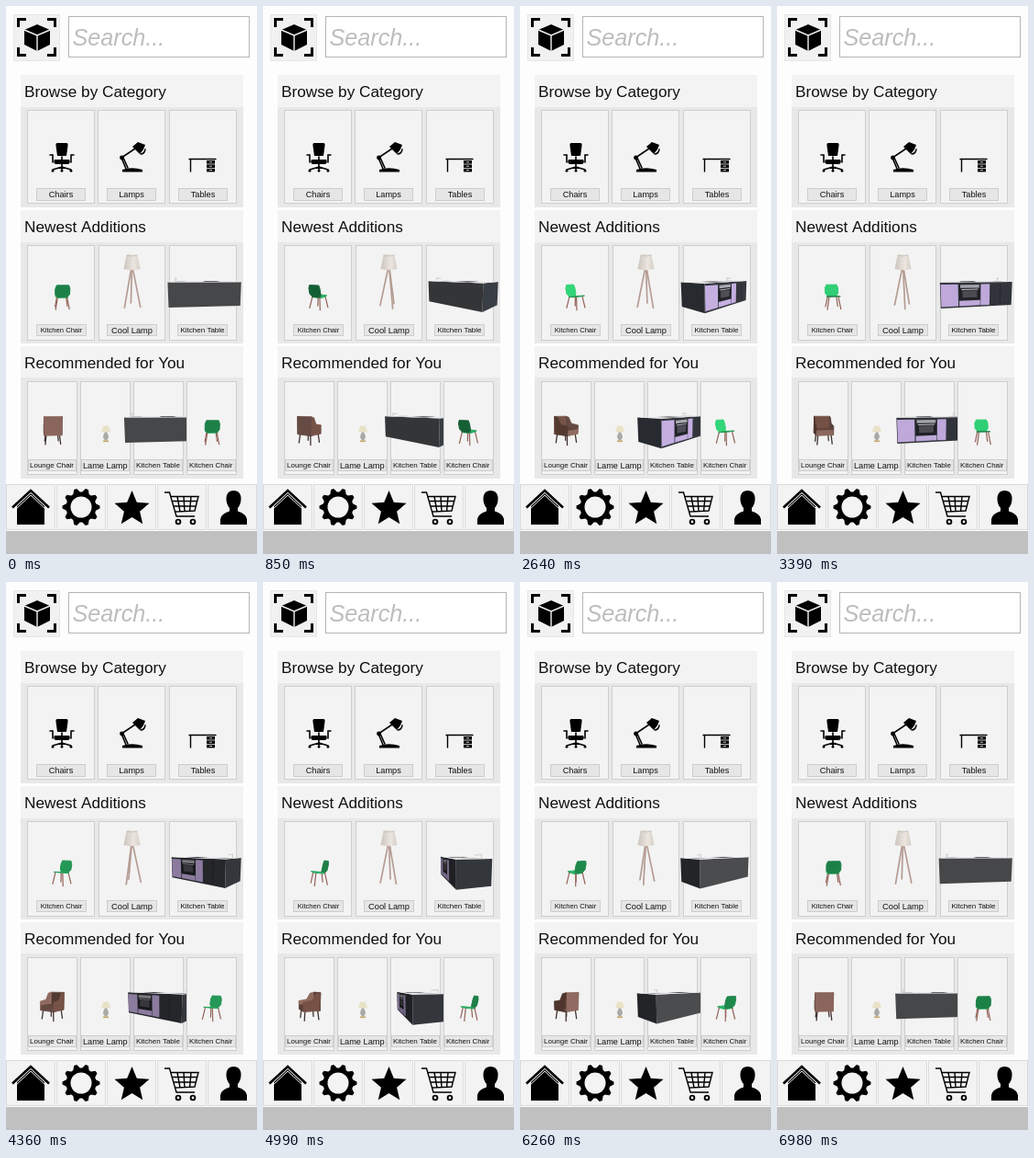
An HTML page with a canvas for the animation above (7 s loop, 274x596 px).

```html
<!DOCTYPE html>
<html lang="en">
<head>
<meta charset="utf-8">
<title>Furniture shop</title>
<style>
html, body { margin: 0; width: 100%; height: 100%; overflow: hidden; background: #fdfdfd; }
canvas { display: block; }
</style>
</head>
<body>
<canvas id="stage" width="274" height="596"></canvas>
<script>
const g = document.getElementById('stage').getContext('2d');
const LOOP = 7000, EYE = 130, PITCH = 0.13;
const LIGHT = [0.55, 0.35, 0.76];
const FONT = '"Liberation Sans", Arial, sans-serif';
let yaw = 0;

// ---- flat drawing helpers ----
function rect(x, y, w, h, fill, edge) {
  g.fillStyle = fill;
  g.fillRect(x, y, w, h);
  if (edge) {
    g.strokeStyle = edge;
    g.lineWidth = 1;
    g.strokeRect(x + 0.5, y + 0.5, w - 1, h - 1);
  }
}
function fill(d, color = '#000') {
  g.fillStyle = color;
  g.fill(new Path2D(d), 'evenodd');
}
function line(d, width, color = '#000') {
  g.strokeStyle = color;
  g.lineWidth = width;
  g.stroke(new Path2D(d));
}
function disc(x, y, r, color = '#000') {
  g.fillStyle = color;
  g.beginPath();
  g.arc(x, y, r, 0, 7);
  g.fill();
}
function text(s, x, y, size, color = '#111', style = '', align = 'left') {
  g.font = `${style} ${size}px ${FONT}`;
  g.textAlign = align;
  g.fillStyle = color;
  g.fillText(s, x, y);
}

// ---- small 3D renderer: x right, y up, z towards the viewer ----
function turn([x, y, z]) {
  const c = Math.cos(yaw), s = Math.sin(yaw);
  const x1 = x * c - z * s, z1 = x * s + z * c;
  const cp = Math.cos(PITCH), sp = Math.sin(PITCH);
  return [x1, y * cp - z1 * sp, z1 * cp + y * sp];
}
function flat([x, y, z]) {
  const k = EYE / (EYE - z);
  return [x * k, -y * k];
}
function lit(color, [a, b, , d], pts) {
  const last = pts[pts.length - 1];
  const u = b.map((v, i) => v - a[i]), w = last.map((v, i) => v - a[i]);
  let n = [u[1] * w[2] - u[2] * w[1], u[2] * w[0] - u[0] * w[2], u[0] * w[1] - u[1] * w[0]];
  const len = Math.hypot(...n) * (n[2] < 0 ? -1 : 1) || 1;
  const dot = n.reduce((sum, v, i) => sum + v / len * LIGHT[i], 0);
  const k = 0.62 + 0.45 * Math.max(0, dot);
  return `rgb(${color.map(v => Math.min(255, Math.round(v * k)))})`;
}
// A part is a face {pts, color, back} or a rod {pts, rod, color}.
function draw(cx, cy, parts, { sort = true, soft = 0 } = {}) {
  let list = parts.map(p => {
    const view = p.pts.map(turn);
    return { ...p, view, depth: view.reduce((s, v) => s + v[2], 0) / view.length };
  });
  if (sort) list.sort((a, b) => a.depth - b.depth);
  g.save();
  g.translate(cx, cy);
  g.lineJoin = g.lineCap = 'round';
  for (const p of list) {
    const q = p.view.map(flat);
    const area = q.reduce((s, [x, y], i) => {
      const [x2, y2] = q[(i + 1) % q.length];
      return s + x * y2 - x2 * y;
    }, 0);
    g.beginPath();
    q.forEach(v => g.lineTo(...v));
    if (p.rod) {
      g.lineWidth = p.rod;
      g.strokeStyle = `rgb(${p.color})`;
      g.stroke();
      continue;
    }
    const color = area > 0 ? p.color : p.back;
    if (!color) continue;
    g.closePath();
    g.fillStyle = g.strokeStyle = lit(color, p.view, p.view);
    g.fill();
    if (soft) {
      g.lineWidth = soft;
      g.stroke();
    }
  }
  g.restore();
}
const face = (pts, color, back) => ({ pts, color, back });
const rod = (a, b, color, width) => ({ pts: [a, b], color, rod: width });
const frontQuad = (x0, x1, y0, y1, z, color, back) =>
  face([[x1, y1, z], [x0, y1, z], [x0, y0, z], [x1, y0, z]], color, back);
const topQuad = (x0, x1, z0, z1, y, color, back) =>
  face([[x0, y, z0], [x1, y, z0], [x1, y, z1], [x0, y, z1]], color, back);

// ---- furniture ----
const A = 35, B = 16, H = 11.8;
const LILAC = [194, 172, 222], DARK = [50, 53, 59], BLACK = [32, 33, 38];
const panel = (x0, x1, y0, y1, color) => frontQuad(x0, x1, y0, y1, -B, color);
const table = [
  face([[-A, H, B], [A, H, B], [A, -H, B], [-A, -H, B]], [73, 74, 75]),
  face([[A, H, B], [A, H, -B], [A, -H, -B], [A, -H, B]], [56, 61, 67]),
  face([[-A, H, -B], [-A, H, B], [-A, -H, B], [-A, -H, -B]], [51, 54, 59]),
  panel(-A, A, -H, H, DARK),
  panel(19, 34.5, -10.5, 10, LILAC),
  panel(-11.5, -2.5, -10.5, 10, LILAC),
  panel(-2, 18, -10.5, -5.5, LILAC),
  panel(-2, 18, -4.8, 10, BLACK),
  panel(-1, 17, 6.5, 9.5, [165, 165, 172]),
  panel(1, 15, -2.5, 4, [78, 76, 84]),
  panel(0, 16, 4.7, 5.5, [200, 200, 205]),
  panel(-23, -22.4, -10, 10, BLACK),
  topQuad(-A, A, -B, B, H, [282, 282, 284]),
  topQuad(-31, -20, -8, 7, H, [190, 192, 196]),
  topQuad(0, 16, -11, 9, H, [70, 70, 76]),
  rod([-29, H, 9], [-29, H + 3.5, 9], [205, 205, 207], 1),
  rod([-29, H + 3.5, 9], [-28, H + 3, 3], [205, 205, 207], 1)
];

const corners = [[-1, -1], [1, -1], [1, 1], [-1, 1]];
const legs = (top, r1, bottom, r2, color, width) =>
  corners.map(([x, z]) => rod([x * r1, top, z * r1], [x * r2, bottom, z * r2], color, width));

const LEAF = [48, 205, 116], MOSS = [30, 138, 76];
const kitchenChair = [
  ...legs(-1, 5, -13.5, 7.2, [146, 98, 88], 1.2),
  face([[6, 11.5, 8.5], [-6, 11.5, 8.5], [-7.5, 8, 8], [-7.5, 2, 6.5], [-5, -1, 5],
    [5, -1, 5], [7.5, 2, 6.5], [7.5, 8, 8]], LEAF, MOSS),
  face([[-5, 0, -7.5], [5, 0, -7.5], [7, -0.5, -4], [6, -1.5, 5], [-6, -1.5, 5], [-7, -0.5, -4]],
    LEAF, MOSS)
];

const HIDE = [118, 82, 70], RUST = [142, 105, 95];
const arm = x => face([[x, 14, 9], [x, 13, 4], [x, 6, 0], [x, 4.5, -9.5], [x, -5, -9], [x, -5, 8]],
  x < 0 ? RUST : HIDE, x < 0 ? HIDE : RUST);
const loungeChair = [
  ...legs(-5, 7, -14.5, 8, [62, 48, 46], 1.3),
  frontQuad(-9, 9, -5, 14, 9, HIDE, RUST),
  arm(-9), arm(9),
  topQuad(-8, 8, -9, 8, 0, HIDE),
  frontQuad(-8.5, 8.5, -5, 0, -9, RUST, HIDE)
];

const tripod = [0, 1, 2].map(i => {
  const a = i * Math.PI * 2 / 3 + 0.5;
  return rod([Math.cos(a), 13, Math.sin(a)], [Math.cos(a) * 10, -28, Math.sin(a) * 10],
    [181, 156, 147], 1.7);
});

function coolLamp(x, y) {
  draw(x, y, tripod);
  const shade = g.createLinearGradient(x - 9, 0, x + 9, 0);
  shade.addColorStop(0, '#cbc4bd');
  shade.addColorStop(0.6, '#ebe6df');
  shade.addColorStop(1, '#d6cec6');
  fill(`M${x - 6} ${y - 28}Q${x} ${y - 30} ${x + 6} ${y - 28}L${x + 9} ${y - 13}
    Q${x} ${y - 10.5} ${x - 9} ${y - 13}Z`, shade);
  line(`M${x - 6} ${y - 28}Q${x} ${y - 26} ${x + 6} ${y - 28}`, 0.6, '#b9b2aa');
}
function lameLamp(x, y) {
  fill(`M${x - 2.5} ${y - 9}H${x + 2.5}L${x + 5} ${y - 2.5}Q${x} ${y - 1} ${x - 5} ${y - 2.5}Z`, '#e9e1c6');
  fill(`M${x - 1} ${y - 2}H${x + 1}L${x + 3} ${y + 2}Q${x + 3} ${y + 5} ${x + 1} ${y + 7}
    H${x - 1}Q${x - 3} ${y + 5} ${x - 3} ${y + 2}Z`, '#a9a9a6');
  rect(x - 3, y + 7, 6, 1.6, '#c2a865');
}

// ---- screen ----
function section(title, y, inner, bottom) {
  rect(16, y, 243, bottom - y, '#f3f3f3');
  rect(16, inner, 243, bottom - inner, '#e8e8e8');
  text(title, 20, y + 23.5, 17.2);
}
function card(x, y, w, h, label, size, tag) {
  rect(x, y, w, h, '#f3f3f3', '#cfcfcf');
  const [tx, ty, tw, th] = tag;
  rect(tx, ty, tw, th, '#e6e6e6', '#cdcdcd');
  g.save();
  g.beginPath();
  g.rect(x, ty, w - 1, th);
  g.clip();
  const wide = tw > 50 && w < 60;
  text(label, wide ? tx + 2 : tx + tw / 2, ty + th / 2 + size * 0.36, size, '#111', '', wide ? 'left' : 'center');
  g.restore();
}

function header() {
  rect(8, 9, 51, 51, '#f1f1f1', '#e6e6e6');
  line('M13.5 23V14.5H22M45 14.5H53.5V23M53.5 45V53.5H45M22 53.5H13.5V45', 3);
  fill('M34 20L48 26V42L34 49L20 42V26Z');
  line('M20 26L34 32L48 26M34 32V49', 1.4, '#f1f1f1');
  rect(68, 11, 198, 45, '#fff', '#b5b5b5');
  text('Search...', 72.5, 43, 25.2, '#bdbdbd', 'italic');
}

function categoryIcons() {
  g.lineCap = 'round';
  fill('M56 149H66Q68 149 67.5 152L66 163H56L54.5 152Q54 149 56 149Z');
  fill('M53 167H69Q71 170 68 172H54Q51 170 53 167Z');
  line('M51 170V162H48M71 170V162H74M61 164V177M51 178L61 175L71 178M61 175V179', 1.6);
  for (const x of [51, 61, 71]) disc(x, 179.3, 1.4);

  fill('M127 180.5V178Q137 174.500 149 178V180.500Z');
  line('M131 177L126 165L141 155M133 176L128 165', 1.6);
  disc(126.5, 165, 2.4);
  fill('M138 153L144 148L152 151L150 156L146 161Z');
  line('M147 161Q151 161 152 156', 1.5);

  line('M200 166.500H229M201.500 167V180', 1.4);
  for (let i = 0; i < 3; i++) {
    rect(219, 168 + i * 4.4, 9, 3.6, '#000');
    rect(222, 169.4 + i * 4.4, 3, 0.8, '#fff');
  }
  g.lineCap = 'butt';
}

function nav() {
  rect(0, 571, 274, 25, '#c0c0c0');
  for (let i = 0; i < 5; i++) rect(i * 55, 520, 54, 50, '#f3f3f3', '#dadada');

  fill('M12 544L27 530L42 544V564H12Z');
  line('M7 545.500L27 527L47 545.500', 2.6);
  line('M11 547L27 532L43 547', 1, '#f3f3f3');

  const teeth = 10;
  g.beginPath();
  for (let i = 0; i < teeth * 4; i++) {
    const a = (i - 0.5) * Math.PI / teeth / 2;
    const r = i % 4 < 2 ? 20.5 : 16.5;
    g.lineTo(82 + r * Math.cos(a), 545 + r * Math.sin(a));
  }
  g.fillStyle = '#000';
  g.fill();
  disc(82, 545, 11.5, '#f3f3f3');

  g.beginPath();
  for (let i = 0; i < 10; i++) {
    const a = i * Math.PI / 5 - Math.PI / 2, r = i % 2 ? 9 : 20;
    g.lineTo(137.5 + r * Math.cos(a), 547 + r * Math.sin(a));
  }
  g.fillStyle = '#000';
  g.fill();

  line('M173 529H178.500L186 555H206M180 533.500H210L206 549L184.500 550M181.500 538.500H208.500M183 544H207' +
    'M187 533.500L190 550M194 533.500L195 550M202 533.500L200.500 550', 1.4);
  for (const x of [188, 204]) {
    disc(x, 561, 3.3);
    disc(x, 561, 1.4, '#f3f3f3');
  }

  fill('M248.500 527C254 527 257 531 256.500 537C256 543 253 548 248.500 548C244 548 241 543 240.500 537C240 531 243 527 248.500 527Z');
  fill('M234 564V558Q235 552 244 549.500V545H253V549.500Q262 552 263 558V564Z');
}

function frame(now) {
  yaw = (now % LOOP) / LOOP * Math.PI * 2 - 0.1;
  rect(0, 0, 274, 596, '#fdfdfd');
  header();

  section('Browse by Category', 75, 110, 219);
  ['Chairs', 'Lamps', 'Tables'].forEach((s, i) => {
    const x = 23 + i * 77.5 | 0;
    card(x, 113, 74, 102, s, 9.2, [x + 10, 198, 54, 14]);
  });
  categoryIcons();

  section('Newest Additions', 222, 257, 367);
  section('Recommended for You', 370, 404, 514);
  g.save();
  g.beginPath();
  g.rect(16, 222, 242, 292);
  g.clip();

  card(23, 260, 74, 104, 'Kitchen Chair', 7.6, [33, 346, 55, 13]);
  draw(61, 315, kitchenChair, { soft: 1 });
  card(101, 260, 73, 104, 'Cool Lamp', 9.3, [110, 346, 55, 13]);
  coolLamp(137.5, 299);
  card(178, 260, 74, 104, 'Kitchen Table', 8, [187, 346, 55, 13]);
  draw(216, 311.5, table, { sort: false });

  card(23, 408, 55, 102, 'Lounge Chair', 8, [24, 493, 53, 13]);
  draw(50.5, 460.5, loungeChair, { soft: 0.8 });
  card(81, 408, 55, 102, 'Lame Lamp', 9.2, [82, 493, 53, 13]);
  lameLamp(109, 465.5);
  card(139, 408, 55, 102, 'Kitchen Table', 8, [140, 493, 53, 13]);
  draw(168.5, 458.5, table, { sort: false });
  card(197, 408, 55, 102, 'Kitchen Chair', 7.9, [198, 493, 53, 13]);
  draw(224.5, 462, kitchenChair, { soft: 1 });
  g.restore();

  nav();
}

const start = performance.now();
function tick() {
  frame(performance.now() - start);
  requestAnimationFrame(tick);
}
tick();
</script>
</body>
</html>
```
